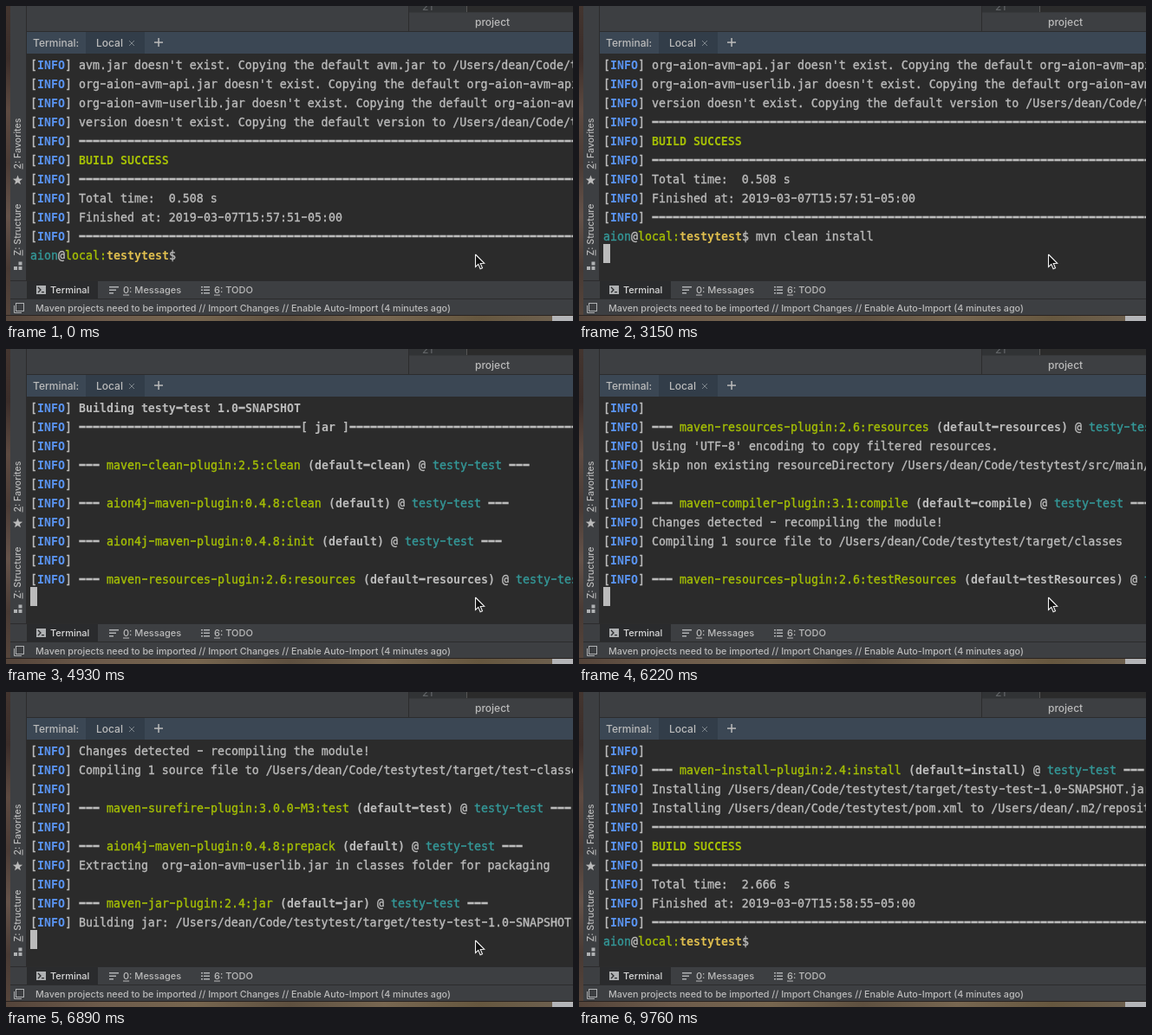
Recreate the animation shown at these times as an HTML page with a canvas. Size 654x364 px, loop 9.86 s.

```html
<!DOCTYPE html>
<html lang="en">
<head>
<meta charset="utf-8">
<title>Terminal build</title>
<style>
html, body { margin: 0; width: 100%; height: 100%; overflow: hidden; background: #2b2b2b; }
canvas { display: block; width: 654px; height: 364px; }
</style>
</head>
<body>
<canvas id="stage"></canvas>
<script>
const W = 654, H = 364, LOOP = 9860;
const COL = 8, ROW = 22, LEFT = 28, TOP = 55, ROWS = 11;
const GRAY = '#bbbbbb', BLUE = '#5a94f2', GREEN = '#a5bf05', CYAN = '#349898', YELLOW = '#dfbe4e';
const PANEL = '#3d3f42', DARK = '#2b2b2b', EDGE = '#2c2c2d';
const MONO = '13.288px "DejaVu Sans Mono", monospace';

const canvas = document.getElementById('stage');
const ctx = canvas.getContext('2d');
const dpr = window.devicePixelRatio || 1;
canvas.width = W * dpr;
canvas.height = H * dpr;

// Log lines are lists of runs: [text, colour, bold]
const home = '/Users/dean';
const code = home + '/Code/testytest';
const info = (...runs) => [['['], ['INFO', BLUE, true], ['] '], ...runs];
const say = text => info([text]);
const strong = (text, color = GRAY) => info([text, color, true]);
const blank = info();
const rule = strong('-'.repeat(72));
const step = (goal, id) => info(
  ['--- ', GRAY, true], [goal, GREEN], [' '], [`(${id})`, GRAY, true],
  [' @ '], ['testy-test', CYAN], [' ---', GRAY, true]);
const copied = name => say(`${name} doesn't exist. Copying the default ${name} to ${code}/lib`);
const summary = (time, end) => [
  rule, strong('BUILD SUCCESS', GREEN), rule,
  say('Total time:  ' + time), say('Finished at: ' + end), rule];
const resources = kind => [
  say("Using 'UTF-8' encoding to copy filtered resources."),
  say(`skip non existing resourceDirectory ${code}/src/${kind}/resources`), blank];
const compiling = dir => [
  say('Changes detected - recompiling the module!'),
  say(`Compiling 1 source file to ${code}/target/${dir}`), blank];
const prompt = typed => [
  ['aion', CYAN], ['@'], ['local:', GREEN], ['testytest', YELLOW, true], ['$ ' + typed]];

const before = [
  ...['avm.jar', 'org-aion-avm-api.jar', 'org-aion-avm-userlib.jar', 'version'].map(copied),
  ...summary('0.508 s', '2019-03-07T15:57:51-05:00')];
const aion4j = 'aion4j-maven-plugin:0.4.8:';
const log = [
  say('Scanning for projects...'), blank,
  strong('-'.repeat(23) + '< testytest:testy-test >' + '-'.repeat(25)),
  strong('Building testy-test 1.0-SNAPSHOT'),
  strong('-'.repeat(32) + '[ jar ]' + '-'.repeat(33)), blank,
  step('maven-clean-plugin:2.5:clean', 'default-clean'), blank,
  step(aion4j + 'clean', 'default'), blank,
  step(aion4j + 'init', 'default'), blank,
  step('maven-resources-plugin:2.6:resources', 'default-resources'),
  ...resources('main'),
  step('maven-compiler-plugin:3.1:compile', 'default-compile'),
  ...compiling('classes'),
  step('maven-resources-plugin:2.6:testResources', 'default-testResources'),
  ...resources('test'),
  step('maven-compiler-plugin:3.1:testCompile', 'default-testCompile'),
  ...compiling('test-classes'),
  step('maven-surefire-plugin:3.0.0-M3:test', 'default-test'), blank,
  step(aion4j + 'prepack', 'default'),
  say('Extracting  org-aion-avm-userlib.jar in classes folder for packaging'), blank,
  step('maven-jar-plugin:2.4:jar', 'default-jar'),
  say(`Building jar: ${code}/target/testy-test-1.0-SNAPSHOT.jar`), blank,
  step('maven-install-plugin:2.4:install', 'default-install'),
  say(`Installing ${code}/target/testy-test-1.0-SNAPSHOT.jar to ${home}/.m2/repository`),
  say(`Installing ${code}/pom.xml to ${home}/.m2/repository`),
  ...summary('2.666 s', '2019-03-07T15:58:55-05:00')];

// Timeline in ms
const COMMAND = 'mvn clean install';
const keys = [1040, 1130, 1220, 1310, 1450, 1580, 1760,
  ...Array.from({ length: 9 }, (_, i) => 1910 + i * 118.75), 3010];
const ENTER = 3150, DONE = 7100;
const output = [[4170, 1], [4400, 5], [4530, 7], [4640, 9], [4790, 11], [4930, 13],
  [5110, 17], [5470, 19], [6220, 21], [6250, 23], [6310, 27], [6630, 29], [6760, 31],
  [6890, 35], [6950, 37], [7020, 39], [DONE, log.length]];
const blinks = [330, 840, 1040, 7570, 8080, 8590, 9120, 9630];
const passed = (times, t) => times.filter(x => x <= t).length;

function rect(x, y, w, h, color) {
  ctx.fillStyle = color;
  ctx.fillRect(x, y, w, h);
}

function label(text, x, y, size = 11, color = GRAY) {
  ctx.font = `500 ${size}px Inter, sans-serif`;
  ctx.fillStyle = color;
  ctx.fillText(text, x, y);
}

// Label whose first character is an underlined shortcut
function shortcut(text, x, y, size) {
  label(text, x, y, size);
  rect(x, y + 1.5, ctx.measureText(text[0]).width, 1, GRAY);
}

function path(points, color) {
  ctx.beginPath();
  points.forEach(([x, y]) => ctx.lineTo(x, y));
  ctx.closePath();
  ctx.fillStyle = color;
  ctx.fill();
}

function stroke(points, color, width = 1) {
  ctx.beginPath();
  points.forEach(([x, y], i) => i ? ctx.lineTo(x, y) : ctx.moveTo(x, y));
  ctx.strokeStyle = color;
  ctx.lineWidth = width;
  ctx.stroke();
}

function gradient(x1, y1, stops) {
  const g = ctx.createLinearGradient(0, 0, x1, y1);
  stops.forEach((c, i) => g.addColorStop(i / (stops.length - 1), c));
  return g;
}

function drawDesktop() {
  rect(0, 0, 5, H, gradient(0, H, ['#43352f', '#3b2d29', '#5d4a41', '#4a3b35', '#65534a', '#483a34', '#57463c']));
  rect(0, 357, W, 7, gradient(W, 0, ['#54443a', '#6d5b4b', '#77664f', '#5e5040', '#786751', '#66573f', '#6f6252']));
  rect(630, 358, W - 630, 6, '#b4b5b8');
  rect(0, 357, W, 1, '#2a2320');
}

function drawTopPanels() {
  rect(5, 0, W - 5, 357, PANEL);
  rect(465, 0, 66, 7, '#313335');
  rect(531, 0, W - 531, 7, DARK);
  rect(531, 0, 1, 7, '#555555');
  label('21', 480, 5, 12, '#606366');
  rect(465, 7, W - 465, 1, '#37393b');
  rect(464, 0, 1, 30, EDGE);
  label('project', 541, 23, 12);
  rect(24, 29, W - 24, 1, EDGE);
  rect(24, 30, W - 24, 25, '#3b4754');
  rect(92, 30, 68, 25, '#323d49');
  label('Terminal:', 31, 47, 12);
  label('Local', 104, 47, 12);
  stroke([[142, 40], [148, 46]], '#7d858c');
  stroke([[148, 40], [142, 46]], '#7d858c');
  rect(171, 41.3, 10, 1.5, GRAY);
  rect(175.3, 37, 1.5, 10, GRAY);
}

function drawSideBar() {
  const vertical = (text, y) => {
    ctx.save();
    ctx.translate(17, y);
    ctx.rotate(-Math.PI / 2);
    shortcut(text, 0, 0, 10.6);
    ctx.restore();
  };
  vertical('2: Favorites', 188.5);
  vertical('Z: Structure', 288.5);
  path(Array.from({ length: 10 }, (_, i) => {
    const r = i % 2 ? 2.5 : 6, a = i * Math.PI / 5 - Math.PI / 2;
    return [13.5 + r * Math.cos(a), 201.5 + r * Math.sin(a)];
  }), GRAY);
  [[9, 301], [14.5, 301], [14.5, 295.5]].forEach(([x, y]) => rect(x, y, 4, 4, '#afb1b3'));
  rect(23, 0, 1, 317, EDGE);
}

function drawBottomBars() {
  rect(5, 317, W - 5, 1, EDGE);
  rect(24, 318, 82, 20, '#2a2b2d');
  rect(35, 323, 11, 10, '#afb1b3');
  stroke([[37, 325], [40, 328], [37, 331]], '#2a2b2d', 1.3);
  rect(41, 330, 3, 1.2, '#2a2b2d');
  label('Terminal', 51, 332, 11, '#d8d8d8');
  [11, 8, 5].forEach((w, i) => rect(119, 324 + i * 3.5, w, 1.5, '#afb1b3'));
  shortcut('0: Messages', 135, 332);
  for (let y = 324; y < 333; y += 3.5) {
    rect(225, y, 2, 1.5, '#afb1b3');
    rect(228, y, 7, 1.5, '#afb1b3');
  }
  shortcut('6: TODO', 240, 332);
  rect(5, 338, W - 5, 1, EDGE);
  ctx.strokeStyle = '#afb1b3';
  ctx.lineWidth = 1;
  ctx.strokeRect(11.5, 343.5, 9, 9);
  stroke([[9.5, 346], [9.5, 354.5], [18, 354.5]], '#afb1b3');
  label('Maven projects need to be imported // Import Changes // Enable Auto-Import (4 minutes ago)', 34, 353, 10.75);
}

// Hyphens are drawn as wide bars, as the terminal face has them
function drawLine(runs, row) {
  const base = TOP + row * ROW + 18;
  let x = LEFT;
  for (const [text, color = GRAY, bold] of runs) {
    ctx.font = (bold ? 'bold ' : '') + MONO;
    for (const part of text.split(/(-)/)) {
      if (part === '-') {
        if (bold) rect(x + 0.3, base - 6.3, 7.4, 2.6, color);
        else rect(x + 1, base - 5.8, 6, 1.6, color);
      } else {
        ctx.fillStyle = ctx.strokeStyle = color;
        ctx.fillText(part, x, base);
        if (!bold) {
          // a thin outline gives the regular weight its smoothed look
          ctx.lineWidth = 0.35;
          ctx.strokeText(part, x, base);
        }
      }
      x += part.length * COL;
    }
  }
  return x;
}

function screenLines(t) {
  if (t < ENTER) return [...before, prompt(COMMAND.slice(0, passed(keys, t)))];
  const n = passed(output.map(o => o[0]), t);
  const shown = n ? output[n - 1][1] : 0;
  const last = t < DONE ? [] : prompt('');
  return [...before, prompt(COMMAND), ...log.slice(0, shown), last];
}

function drawTerminal(t) {
  ctx.save();
  ctx.beginPath();
  ctx.rect(24, TOP, W - 24, 317 - TOP);
  ctx.clip();
  rect(24, TOP, W - 24, 317 - TOP, DARK);
  let end = LEFT;
  screenLines(t).slice(-ROWS).forEach((line, row) => { end = drawLine(line, row); });
  if (passed(blinks, t) % 2) rect(end, TOP + (ROWS - 1) * ROW, COL, ROW, GRAY);
  ctx.restore();
}

function drawPointer(t) {
  const moves = Math.max(0, Math.floor((t - 8410) / 30));
  if (moves > 5) return;
  ctx.save();
  ctx.translate(541.5, 287 + 80 * Math.pow(moves / 6, 1.5));
  const arrow = [[0, 0], [0, 14.5], [3.3, 11.4], [5.6, 16.8], [8, 15.8], [5.7, 10.5], [10.2, 10.3]];
  path(arrow, '#111111');
  stroke([...arrow, arrow[0]], '#f2f2f2', 1.1);
  ctx.restore();
}

function draw(now) {
  const t = now % LOOP;
  ctx.setTransform(dpr, 0, 0, dpr, 0, 0);
  drawDesktop();
  drawTopPanels();
  drawSideBar();
  drawBottomBars();
  drawTerminal(t);
  drawPointer(t);
}

const start = performance.now();
function tick() {
  draw(performance.now() - start);
  requestAnimationFrame(tick);
}
tick();
</script>
</body>
</html>
```
